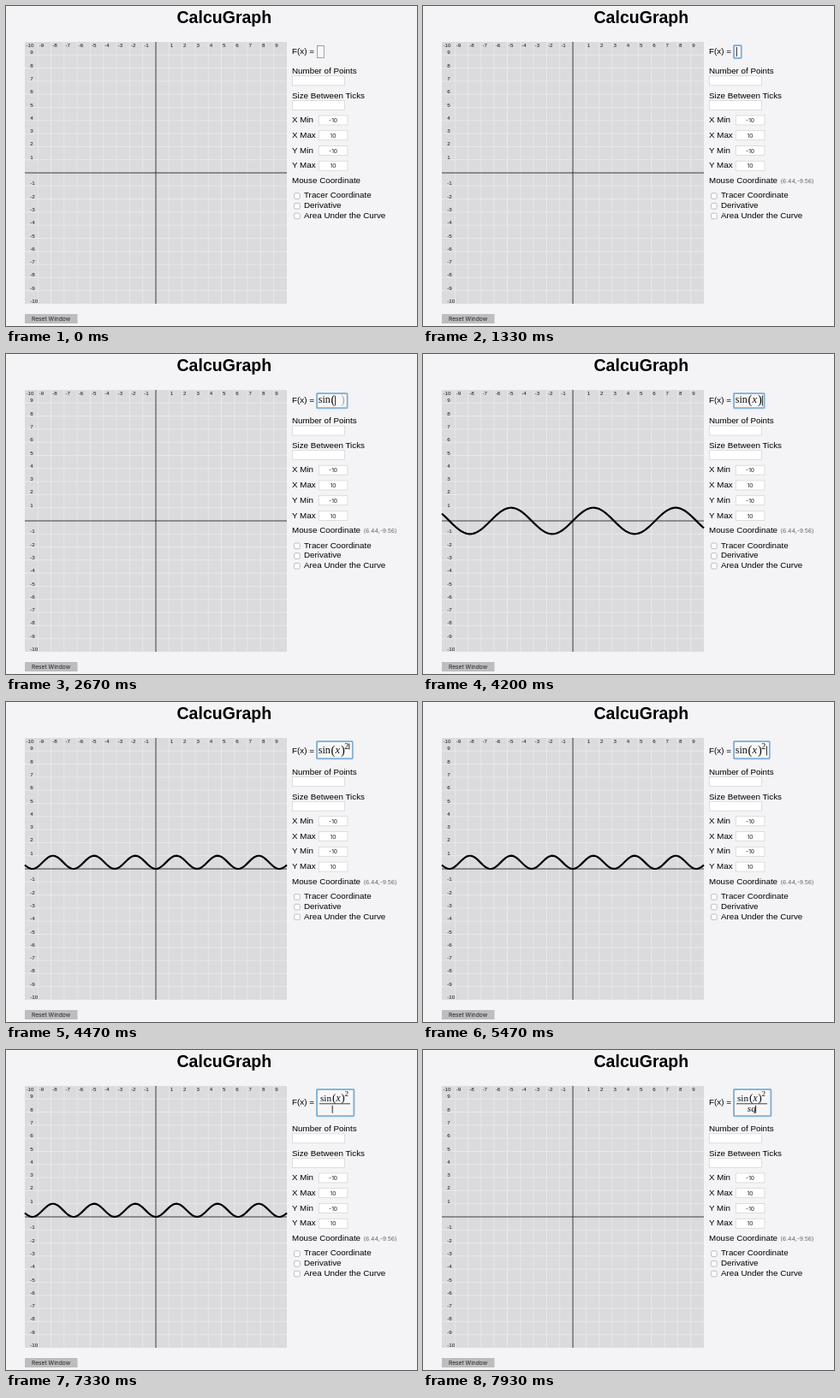
An HTML page that plays this animation: 480x374 px, repeating every 8000 ms.

```html
<!DOCTYPE html>
<html lang="en">
<head>
<meta charset="utf-8">
<title>CalcuGraph</title>
<style>
  html, body { margin: 0; width: 100%; height: 100%; overflow: hidden; background: #f4f3f5; }
  svg { display: block; width: 480px; height: 374px; }
  text { font: 9.8px "Liberation Sans", Arial, sans-serif; white-space: pre; }
  .title { font-weight: bold; font-size: 19.55px; }
  .tick { font-size: 6.2px; fill: #111; }
  .ui { font: 6.7px Inter, sans-serif; fill: #222; text-anchor: middle; }
  .coord { font: 6.85px Inter, sans-serif; fill: #666; }
  .math { font-family: "Liberation Serif", Times, serif; }
</style>
</head>
<body>
<svg viewBox="0 0 480 374"><g id="page"></g><g id="form"></g><g id="field"></g></svg>
<script>
const LOOP = 8000, UNIT = 15.3, CX = 175, CY = 195;
const $ = id => document.getElementById(id);
const text = (s, x, y, cls = '', extra = '') =>
  `<text x="${x}" y="${y}" class="${cls}" ${extra}>${s}</text>`;
const rect = (x, y, w, h, fill, extra = '') =>
  `<rect x="${x}" y="${y}" width="${w}" height="${h}" fill="${fill}" ${extra}/>`;
const line = (x1, y1, x2, y2, color, width) =>
  `<path d="M${x1} ${y1}L${x2} ${y2}" stroke="${color}" stroke-width="${width}"/>`;
const input = (x, y, w, value = '') =>
  rect(x, y, w, 11, '#fff', 'stroke="#d2d2d4" stroke-width=".7"') + text(value, x + w / 2, y + 8.1, 'ui');

function drawPage() {
  let s = text('CalcuGraph', 199.5, 19.5, 'title') + rect(22, 42, 306, 306, '#dbdadc');
  for (let i = -9; i < 10; i++) {
    s += line(CX + i * UNIT, 42, CX + i * UNIT, 348, '#ebebec', .8);
    s += line(22, CY + i * UNIT, 328, CY + i * UNIT, '#ebebec', .8);
  }
  s += line(CX, 42, CX, 348, '#222', .9) + line(22, CY, 328, CY, '#222', .9);
  for (let i = -10; i < 10; i++) if (i) {
    s += text(i, CX + i * UNIT + 1.5, 48.3, 'tick');
    s += text(i, 28.3, CY - i * UNIT - 1, 'tick');
  }
  s += '<path id="curve" fill="none" stroke="#000" stroke-width="2.2"/>';
  s += rect(22, 360, 61.5, 11, '#bdbcbe') + text('Reset Window', 52.6, 368, 'ui');
  $('page').innerHTML = s;
}

function drawForm() {
  let s = text('Number of Points', 334, 79) + input(334.4, 81.8, 61)
        + text('Size Between Ticks', 334, 107.8) + input(334.4, 110.4, 61);
  ['X Min', 'X Max', 'Y Min', 'Y Max'].forEach((name, i) => {
    s += text(name, 334, 136.2 + i * 17.75) + input(365.3, 128 + i * 17.75, 33.6, i % 2 ? '10' : '-10');
  });
  s += text('Mouse Coordinate', 334, 207.2) + text('(6.44,-9.56)', 417.6, 207, 'coord', 'id="coord"');
  ['Tracer Coordinate', 'Derivative', 'Area Under the Curve'].forEach((name, i) => {
    const y = 224.4 + i * 11.7;
    s += rect(336.6, y - 5.6, 6.6, 6.6, '#fff', 'rx="1.4" stroke="#b0b0b2" stroke-width=".8"') + text(name, 348, y);
  });
  $('form').innerHTML = s;
}

// Math glyphs
const glyph = (s, x, y, size, italic, color = '#111') =>
  text(s, x, y, 'math', `style="font-size:${size}px;font-style:${italic ? 'italic' : 'normal'};fill:${color}"`);
const roman = (s, x, y, size = 12) => glyph(s, x, y, size);
const italic = (s, x, y, size = 12) => glyph(s, x, y, size, true);
const sin = (y, close = '#111', arg = 'x') =>
  roman('sin', 364.8, y) + roman('(', 379.6, y + .6, 14.5) + italic(arg, 384.6, y, 12.5)
  + glyph(')', 391, y + .6, 14.5, false, close);
const squared = sin(60) + roman('2', 395.3, 55, 10);
const fraction = roman('sin', 367, 59.5, 11.2) + roman('(', 381, 60, 13.5) + italic('x', 385.5, 59.5, 11.5)
  + roman(')', 391.3, 60, 13.5) + roman('2', 395.6, 54.4, 9.2) + line(366, 62.8, 402, 62.8, '#111', .8);

// Field sizes: [width, height, form shift, label shift]
const flat = w => [w, 14.2, 0, 0];
const tall = [34.6, 16.4, 2.2, 1.4], power = [40.8, 19.4, 5.8, 3.8], stack = [42.4, 30.4, 16, 8];
const sine = Math.sin, sineSq = x => Math.sin(x) ** 2;

// Typing steps: start, size, glyphs, caret [x, top, bottom], plotted function
const steps = [
  [0, flat(7.8), ''],
  [900, flat(7.8), '', [366.3, 48, 59]],
  [1700, flat(9.5), italic('s', 364.8, 56.5), [370.2, 48, 59]],
  [1930, flat(13), italic('si', 364.8, 56.5), [373.6, 48, 59]],
  [2130, flat(19), roman('sin', 364.8, 56.5), [380, 48, 59]],
  [2400, tall, sin(57.2, '#aaa', ''), [384.6, 49, 60]],
  [2900, tall, sin(57.2, '#aaa'), [390.7, 49, 60], sine],
  [3800, tall, sin(57.2), [396.4, 48.5, 60.5], sine],
  [4270, power, sin(60), [396.2, 48.5, 55.5], sine],
  [4470, power, squared, [400.8, 48.5, 55.5], sineSq],
  [5270, power, squared, [401.4, 51.5, 62.5], sineSq],
  [6270, stack, fraction, [381.2, 64.8, 73.8], sineSq],
  [7600, stack, fraction + italic('s', 381.6, 72, 11.2), [386.4, 64.8, 73.8]],
  [7830, stack, fraction + italic('sq', 378.8, 72, 11.2), [388.6, 64.8, 73.8]]
];

function curvePath(f) {
  let d = '';
  for (let x = -10; x <= 10.001; x += .1)
    d += `${d ? 'L' : 'M'}${(CX + x * UNIT).toFixed(2)} ${(CY - f(x) * UNIT).toFixed(2)}`;
  return d;
}

function drawStep([, [w, h, shift, labelShift], glyphs, caret, f]) {
  const box = extra => rect(363.5, 46.4, w, h, '#f7f7f9', extra);
  $('field').innerHTML = text('F(x) =', 334, 55.8 + labelShift)
    + (caret ? box('stroke="#8bbbdd" stroke-width="3" rx=".6"') + box('stroke="#709ac0" stroke-width=".7"')
             : box('stroke="#8c8c8e" stroke-width=".8"'))
    + glyphs
    + (caret ? `<g id="caret">${line(caret[0], caret[1], caret[0], caret[2], '#111', .9)}</g>` : '');
  $('form').setAttribute('transform', `translate(0 ${shift})`);
  $('curve').setAttribute('d', f ? curvePath(f) : '');
}

let shown;
function frame(now) {
  const t = now % LOOP;
  const step = steps.findLast(s => s[0] <= t);
  if (step !== shown) drawStep(shown = step);
  $('coord').style.opacity = t < 300 ? 0 : 1;
  if (step[3]) $('caret').style.opacity = (t - step[0]) % 1000 < 500 ? 1 : 0;
  requestAnimationFrame(frame);
}

drawPage();
drawForm();
frame(0);
</script>
</body>
</html>
```
